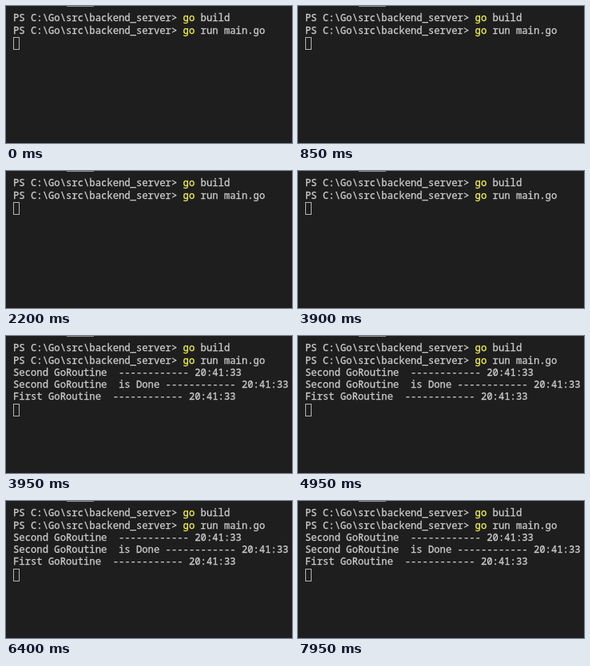
These frames come from a looping animation (358x172 px, 8000 ms). An HTML page:

```html
<!DOCTYPE html>
<html lang="en">
<head>
<meta charset="utf-8">
<title>Terminal run</title>
<style>
  html, body { margin: 0; width: 358px; height: 172px; overflow: hidden; background: #1e1e1e; }
  svg { display: block; }
  text {
    font: 12.22px "Noto Sans Mono", "DejaVu Sans Mono", monospace;
    fill: #ccc; stroke: #ccc; stroke-width: .3; white-space: pre;
  }
  .cmd { fill: #f5f543; stroke: #f5f543; }
</style>
</head>
<body>
<svg width="358" height="172" viewBox="0 0 358 172">
  <rect x="76" width="34" height="1" fill="#8c8c8c"/>
  <text x="9" y="19.3">PS C:\Go\src\backend_server&gt; <tspan class="cmd">go</tspan> build</text>
  <text x="9" y="34.5">PS C:\Go\src\backend_server&gt; <tspan class="cmd">go</tspan> run main.go</text>
  <g id="output">
    <text x="9" y="49.7">Second GoRoutine  ------------ 20:41:33</text>
    <text x="9" y="64.9">Second GoRoutine  is Done ------------ 20:41:33</text>
    <text x="9" y="80.1">First GoRoutine  ------------ 20:41:33</text>
  </g>
  <rect id="cursor" x="9.5" y="39.5" width="7" height="15" fill="none" stroke="#b4b4b4"/>
</svg>
<script>
  const LOOP = 8000, PRINT_AT = 3950;
  const output = document.getElementById("output");
  const cursor = document.getElementById("cursor");

  function draw() {
    const printed = performance.now() % LOOP >= PRINT_AT;
    output.setAttribute("visibility", printed ? "visible" : "hidden");
    cursor.setAttribute("y", printed ? 85.5 : 39.5);
    requestAnimationFrame(draw);
  }
  draw();
</script>
</body>
</html>
```
